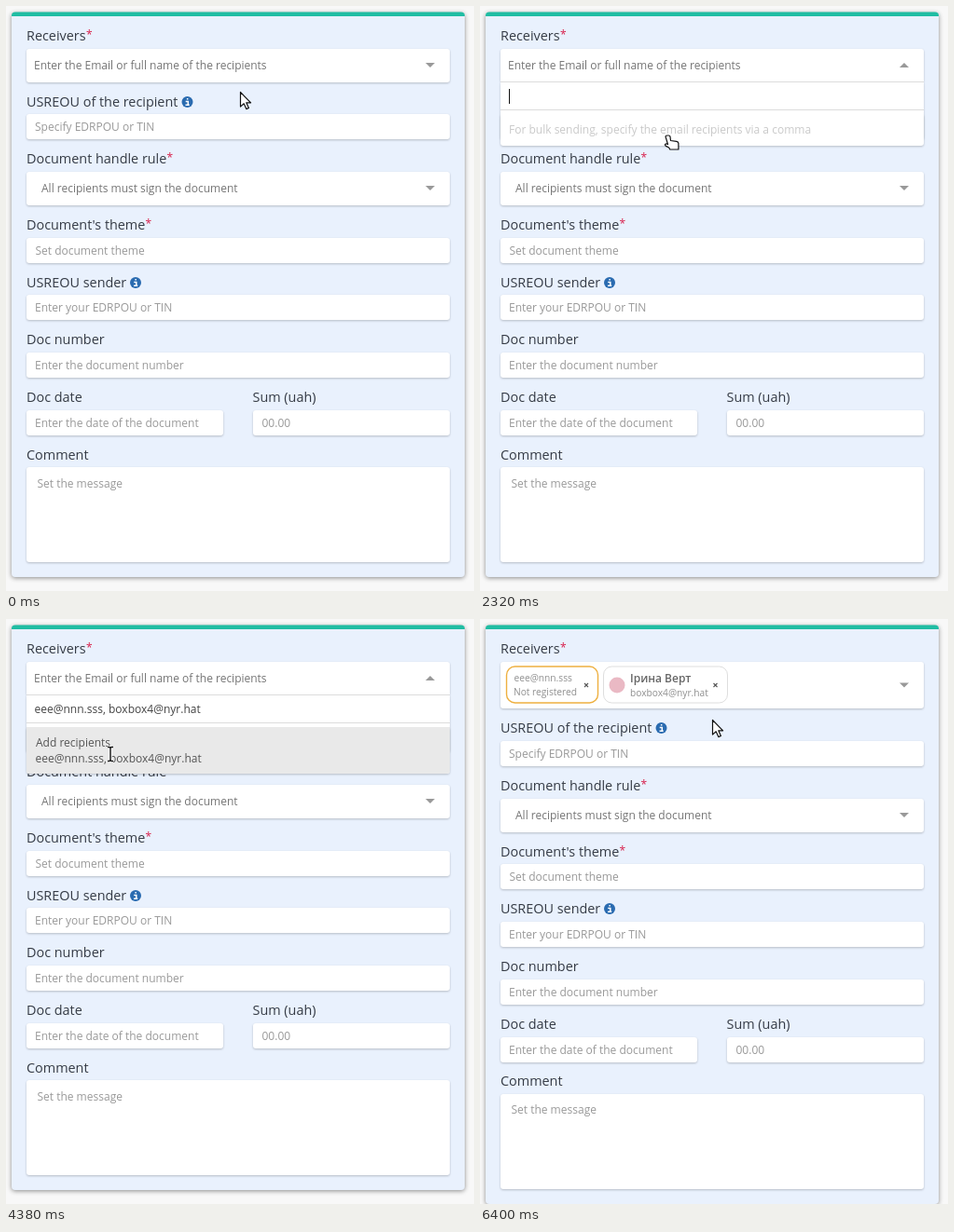
An HTML page that plays this animation: 502x628 px, repeating every 6600 ms.

```html
<!DOCTYPE html>
<html lang="en">
<head>
<meta charset="utf-8">
<title>Document form</title>
<style>
  html, body { margin: 0; width: 100%; height: 100%; overflow: hidden; background: #f8f8f8; }
  svg { display: block; width: 502px; height: 628px; font: 12px "Open Sans", "Noto Sans", sans-serif; }
  text { white-space: pre; }
  .card { fill: #e9f1fd; filter: drop-shadow(0 1px 2.5px rgba(0, 0, 0, .45)); }
  .field { fill: #fff; filter: drop-shadow(0 1px 1px rgba(0, 0, 0, .22)); }
  .label { font-size: 14.4px; fill: #353b45; }
  .star { fill: #d8234e; }
  .hint { fill: #999; }
  .value { fill: #757575; }
  .typed { fill: #444; }
  .option { fill: #555; }
  .disabled { fill: #c9c9c9; }
  .small { font-size: 10.2px; fill: #8f8f8f; }
  .name { font-weight: 600; fill: #666; }
  .arrow { fill: #999; }
  .pointer path { fill: #fff; stroke: #111; stroke-width: 1.2; stroke-linejoin: round; }
</style>
</head>
<body>
<svg id="stage" viewBox="0 0 502 628"></svg>
<script>
const LOOP = 6600, OPEN = 900, PASTE = 3700, CHOOSE = 4700, BLINK = 500;
const EMAIL_A = "eee@nnn.sss", EMAIL_B = "boxbox4@nyr.hat";
const BOTH = `${EMAIL_A}, ${EMAIL_B}`;
const stage = document.getElementById("stage");
const moving = [];

function add(parent, tag, attrs = {}, content) {
  const node = document.createElementNS("http://www.w3.org/2000/svg", tag);
  for (const key in attrs) node.setAttribute(key, attrs[key]);
  if (content) node.textContent = content;
  return parent.appendChild(node);
}
const group = (parent, attrs) => add(parent, "g", attrs);
const text = (parent, cls, x, y, content) => add(parent, "text", { class: cls, x, y }, content);
const rect = (parent, cls, x, y, width, height, rx = 0, fill = "#fff") =>
  add(parent, "rect", { class: cls, x, y, width, height, rx, fill });
const show = (node, on) => node.setAttribute("display", on ? "inline" : "none");

// Groups that slide down by `shift` once the recipients are chosen
function row(shift) {
  const node = group(stage);
  moving.push([node, shift]);
  return node;
}
function label(content, x, y, shift, starX, iconX) {
  const g = row(shift);
  text(g, "label", x, y, content);
  if (starX) text(g, "star", starX, y - 2.5, "*");
  if (iconX) {
    add(g, "circle", { cx: iconX, cy: y - 5, r: 6, fill: "#2a6bb0" });
    add(g, "path", { d: `M${iconX - 1.8} ${y - 5.6}h2.6v3.8M${iconX - 2} ${y - 1.8}h4.2M${iconX - .6} ${y - 8.2}h1.5`,
      fill: "none", stroke: "#fff", "stroke-width": 1.5 });
  }
}
function field(x, y, w, h, cls, tx, ty, content, shift) {
  const g = row(shift);
  rect(g, "field", x, y, w, h, 3);
  text(g, cls, tx, ty, content);
  return g;
}
const triangle = (parent, y, dir) =>
  add(parent, "path", { class: "arrow", d: `M450 ${y - 2.5 * dir}h10l-5 ${5 * dir}z` });

// Card
const card = rect(stage, "card", 6, 7, 486, 606, 4);
add(stage, "path", { d: "M6 11v-1q0-3.5 4-3.5h478q4 0 4 3.5v1z", fill: "#20bda3" });

// Form
label("Receivers", 22, 37, 0, 86);
label("USREOU of the recipient", 22, 108, 14, 0, 194.5);
field(22, 116, 454, 27, "hint", 31, 134, "Specify EDRPOU or TIN", 15);
label("Document handle rule", 22, 169, 15, 172.5);
triangle(field(22, 178, 454, 36, "value", 38, 200, "All recipients must sign the document", 15), 195.5, 1);
label("Document's theme", 22, 240, 15, 149.5);
field(22, 249, 454, 27, "hint", 31.5, 267, "Set document theme", 14);
label("USREOU sender", 22, 302, 14, 0, 139);
field(22, 310, 454, 27, "hint", 31, 328, "Enter your EDRPOU or TIN", 15);
label("Doc number", 22, 363, 15);
field(22, 372, 454, 27, "hint", 31, 390, "Enter the document number", 15);
label("Doc date", 22, 425, 15);
field(22, 434, 211, 27, "hint", 31, 452, "Enter the date of the document", 15);
label("Sum (uah)", 264.5, 425, 15);
field(265, 434, 211, 27, "hint", 274.5, 452, "00.00", 15);
label("Comment", 22, 487, 14);
const comment = row(15);
rect(comment, "field", 22, 495, 454, 102, 3);
text(row(14), "hint", 33.5, 517, "Set the message");

// Recipient picker
const picker = group(stage);
const pickerBox = rect(picker, "field", 22, 46, 454, 36, 3);
const prompt = text(picker, "value", 30, 68, "Enter the Email or full name of the recipients");
const closedArrow = triangle(picker, 63.5, 1);
const openArrow = triangle(picker, 63.5, -1);

const dropdown = group(stage);
const panel = rect(dropdown, "field", 22, 81, 454, 69, 3);
rect(dropdown, "", 22, 79, 454, 6);
rect(dropdown, "", 22, 81, 454, 1, 0, "#dcdcdc");
rect(dropdown, "", 22, 111, 454, 1, 0, "#dcdcdc");
const bulkHint = text(dropdown, "disabled", 31, 137, "For bulk sending, specify the email recipients via a comma");
const found = group(dropdown);
text(found, "typed", 30.5, 101, BOTH);
add(found, "path", { d: "M22 116h454v47q0 3-3 3h-448q-3 0-3-3z", fill: "#e9e9e9" });
text(found, "option", 32, 137, "Add recipients");
text(found, "option", 31.5, 154, BOTH);
const caret = rect(dropdown, "", 31, 89, 1, 16, 0, "#111");

// Chosen recipients
const chips = group(stage);
function chip(x, w, color, width, closeX) {
  add(chips, "rect", { x, y: 51, width: w, height: 39, rx: 9, fill: "#fff", stroke: color, "stroke-width": width });
  add(chips, "path", { d: `M${closeX - 2} 69l4 4m0-4l-4 4`, stroke: "#555", "stroke-width": 1.1 });
}
chip(28.5, 98, "#eeb040", 1.4, 114);
text(chips, "small", 36.5, 67, EMAIL_A);
text(chips, "small", 36, 82, "Not registered");
chip(132.5, 133, "#dedede", 1, 252.5);
add(chips, "circle", { cx: 147, cy: 71, r: 8.5, fill: "#eab9c4" });
text(chips, "name", 161, 68, "Ірина Верт");
text(chips, "small", 161, 83, EMAIL_B);

// Pointers, each with its hot spot at 0,0
const pointer = group(stage, { class: "pointer" });
const shape = d => add(pointer, "path", { d });
const pointers = {
  arrow: shape("M.5 .5v15.6l3.7-3.3 2.6 5.8 2.6-1.2-2.6-5.6h4.8z"),
  hand: shape("M-3 1.2q0-1.2 1.6-1.2h2q1.2 0 1.4 1.4l.5 4.1 6.2.9q2 .4 2.2 2v6.6h-9.2l-1-2-3.2-1.6q-1.8-1.3-.6-2.2 1-.6 2.6.3z"),
  beam: group(pointer)
};
const beamPath = "M-3-7.5h2l1 1 1-1h2M0-6.5v13M-3 7.5h2l1-1 1 1h2";
add(pointers.beam, "path", { d: beamPath, style: "fill:none;stroke:#fff;stroke-width:3.2" });
add(pointers.beam, "path", { d: beamPath, style: "fill:none;stroke:#111;stroke-width:1.4" });

// time, x, y
const route = [
  [0, 251, 92], [600, 243, 65], [920, 243, 65], [1680, 25, 140], [2900, 354, 139],
  [3020, 360, 138], [3360, 363, 138], [3760, 363, 138], [4340, 112, 145],
  [4720, 112, 145], [4880, 143, 115], [5480, 300, 98], [5700, 300, 98], [6400, 249, 108], [LOOP, 249, 108]
];
function position(t) {
  const i = route.findIndex((stop, n) => n > 0 && t <= stop[0]);
  const [t0, x0, y0] = route[i - 1], [t1, x1, y1] = route[i];
  const k = (t - t0) / (t1 - t0), e = k * k * (3 - 2 * k);
  return [x0 + (x1 - x0) * e, y0 + (y1 - y0) * e];
}
function pointerKind(t, x, y) {
  if (t < OPEN) return "arrow";
  if (t < PASTE) return y < 82 ? "arrow" : y < 112 ? "beam" : "hand";
  if (t < CHOOSE) return x < 212 ? "beam" : "arrow";
  return x < 186 ? "beam" : "arrow";
}

function render(t) {
  const chosen = t >= CHOOSE, open = t >= OPEN && !chosen, pasted = t >= PASTE;
  for (const [node, shift] of moving) node.setAttribute("transform", `translate(0 ${chosen ? shift : 0})`);
  card.setAttribute("height", chosen ? 621 : 606);
  pickerBox.setAttribute("height", chosen ? 50 : 36);
  closedArrow.setAttribute("transform", `translate(0 ${chosen ? 7.5 : 0})`);
  show(closedArrow, !open);
  show(openArrow, open);
  show(prompt, !chosen);
  show(chips, chosen);
  show(dropdown, open);
  show(bulkHint, !pasted);
  show(found, pasted);
  panel.setAttribute("height", pasted ? 85 : 69);
  show(caret, Math.floor((t - (pasted ? PASTE : OPEN)) / BLINK) % 2 === 0);
  caret.setAttribute("x", pasted ? 208 : 31);

  const [x, y] = position(t), kind = pointerKind(t, x, y);
  pointer.setAttribute("transform", `translate(${Math.round(x)} ${Math.round(y)})`);
  for (const key in pointers) show(pointers[key], key === kind);
}

const start = performance.now();
function tick() {
  render((performance.now() - start) % LOOP);
  requestAnimationFrame(tick);
}
tick();
</script>
</body>
</html>
```
